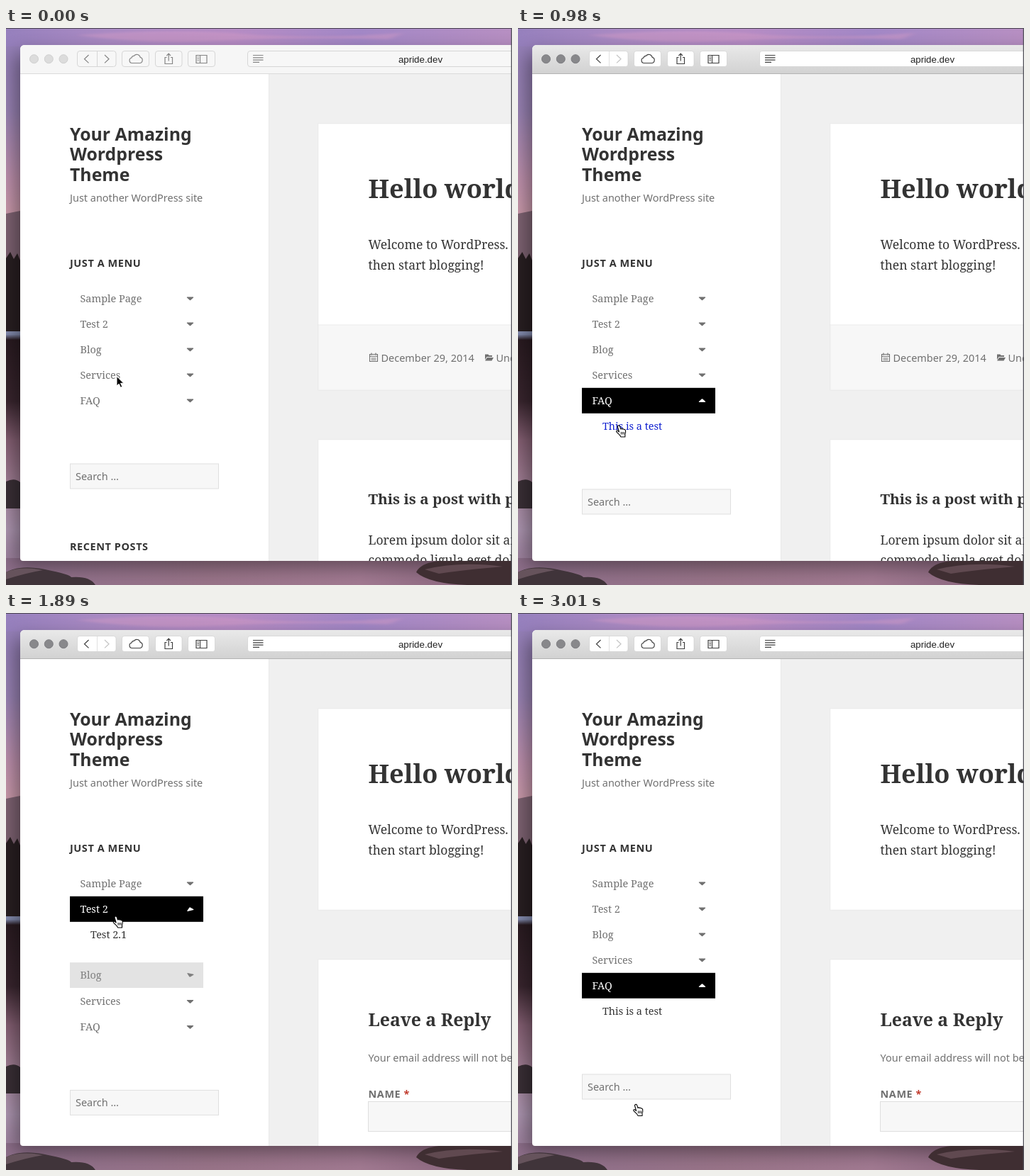
Write an HTML page that moves like this. It is 713 by 786 pixels and loops after 3.08 s.

```html
<!DOCTYPE html>
<html lang="en">
<head>
<meta charset="utf-8">
<title>Accordion menu</title>
<style>
html, body { margin: 0; width: 100%; height: 100%; overflow: hidden; background: #7d6480; }
#stage { display: block; width: 713px; height: 786px; }
text { white-space: pre; }
.sans { font-family: "Noto Sans", "Open Sans", sans-serif; font-size: 14.46px; }
.serif { font-family: "Noto Serif", serif; font-size: 14.46px; }
.ui { font-family: "Liberation Sans", Arial, sans-serif; font-size: 13.3px; }
.body { font-size: 17.56px; }
.big { font-size: 36.16px; }
.b { font-weight: 700; }
.caps { letter-spacing: .04em; }
.dark { fill: #333; }
.grey { fill: #707070; }
.box { fill: #f7f7f7; stroke: #dfdfdf; }
.card { fill: #fff; stroke: #000; stroke-opacity: .045; }

.bar { fill: url(#barOn); }
.rule { fill: #b3b3b3; }
.light { fill: #88888b; stroke: #7c7c80; }
.btn { fill: #fff; stroke: #c6c6c6; stroke-opacity: .55; }
.icon { fill: none; stroke: #404040; stroke-width: 1.2; }
.weak { stroke: #c4c4c4; }
.off .bar { fill: #f6f6f6; }
.off .rule { fill: #dadada; }
.off .light { fill: #dcdcdc; stroke: #cfcfcf; }
.off .btn { fill: #f7f7f7; stroke: #d6d6d6; stroke-opacity: 1; }
.off .icon { stroke: #858585; }
</style>
</head>
<body>
<svg id="stage" viewBox="0 0 713 786">
  <defs>
    <linearGradient id="barOn" x2="0" y2="1">
      <stop stop-color="#e9e9e9"/><stop offset="1" stop-color="#d2d2d2"/>
    </linearGradient>
    <linearGradient id="top">
      <stop stop-color="#9680bd"/><stop offset=".2" stop-color="#aa8ac3"/><stop offset=".45" stop-color="#b68cc4"/>
      <stop offset=".7" stop-color="#a287c6"/><stop offset="1" stop-color="#b78fc2"/>
    </linearGradient>
    <linearGradient id="left" x2="0" y2="1">
      <stop stop-color="#937eb8"/><stop offset=".15" stop-color="#9d86b8"/><stop offset=".27" stop-color="#c495b2"/>
      <stop offset=".34" stop-color="#d2a0b0"/><stop offset=".55" stop-color="#8790b4"/><stop offset=".56" stop-color="#2b1c22"/>
      <stop offset=".67" stop-color="#3b2730"/><stop offset=".74" stop-color="#886276"/><stop offset=".82" stop-color="#a7849b"/>
      <stop offset=".9" stop-color="#b29ab6"/><stop offset="1" stop-color="#937391"/>
    </linearGradient>
    <linearGradient id="water">
      <stop stop-color="#8f708c"/><stop offset=".4" stop-color="#997489"/><stop offset=".7" stop-color="#a27a92"/><stop offset="1" stop-color="#84627a"/>
    </linearGradient>
    <linearGradient id="sky" x2="0" y2="1">
      <stop stop-color="#c4431d"/><stop offset=".2" stop-color="#cb461a"/><stop offset=".34" stop-color="#d5481a"/>
      <stop offset=".45" stop-color="#d83b17"/><stop offset=".56" stop-color="#b92c18"/><stop offset=".68" stop-color="#872118"/><stop offset="1" stop-color="#571610"/>
    </linearGradient>
    <linearGradient id="hill" x2="0" y2="1">
      <stop stop-color="#250c08"/><stop offset="1" stop-color="#0b0303"/>
    </linearGradient>
    <filter id="soft" x="-20%" y="-100%" width="140%" height="300%"><feGaussianBlur stdDeviation="5 1.6"/></filter>
    <filter id="shade" x="-20%" y="-20%" width="140%" height="140%"><feGaussianBlur stdDeviation="14"/></filter>
    <clipPath id="win"><path d="M713 24H26a6 6 0 0 0-6 6V748a4 4 0 0 0 4 4H713z"/></clipPath>
    <clipPath id="photo"><rect x="449" y="135" width="264" height="443"/></clipPath>
  </defs>

  <!-- desktop -->
  <rect width="713" height="786" fill="url(#left)"/>
  <path d="M0 262L20 258V330H0z" fill="#826676"/>
  <path d="M0 325L6 316 11 326 16 318 20 328V428H0z" fill="#2a2023"/>
  <path d="M0 640Q12 634 20 641V678H0z" fill="#3c3138"/>
  <rect width="713" height="26" fill="url(#top)"/>
  <path d="M100 10Q230 0 330 8T560 7L540 16Q400 12 300 18T100 10z" fill="#d49cc7" opacity=".45" filter="url(#soft)"/>
  <rect y="748" width="713" height="38" fill="url(#water)"/>
  <rect x="12" y="36" width="730" height="724" fill="#000" opacity=".42" filter="url(#shade)"/>
  <path d="M0 768Q20 757 55 764T92 775Q118 773 126 786H0z" fill="#40343a"/>
  <path d="M0 768Q20 759 52 765Q28 769 0 778z" fill="#66535c"/>
  <path d="M578 768Q584 755 610 752H713V786H650Q596 784 578 768z" fill="#3f2e32"/>
  <path d="M590 764Q640 752 700 760Q650 764 610 770z" fill="#604950"/>

  <g clip-path="url(#win)">
    <rect x="20" y="24" width="693" height="728" fill="#fff"/>
    <rect x="370" y="64" width="343" height="688" fill="#f0f0f0"/>
    <rect x="370" y="64" width="1" height="688" fill="#e8e8e8"/>

    <g id="chrome">
      <rect class="bar" x="20" y="24" width="693" height="40"/>
      <rect class="rule" x="20" y="64" width="693" height="1"/>
      <circle class="light" cx="39.5" cy="43.7" r="6"/>
      <circle class="light" cx="60.3" cy="43.7" r="6"/>
      <circle class="light" cx="81" cy="43.7" r="6"/>
      <g class="btn">
        <rect x="100.5" y="32.5" width="54.5" height="22" rx="3.5"/>
        <path d="M128.5 33V54"/>
        <rect x="163.5" y="32.5" width="38" height="22" rx="3.5"/>
        <rect x="210.5" y="32.5" width="37.5" height="22" rx="3.5"/>
        <rect x="256.5" y="32.5" width="38" height="22" rx="3.5"/>
        <rect x="340.5" y="32.5" width="400" height="22" rx="3.5"/>
      </g>
      <path class="icon" stroke-width="1.6" d="M116.5 38L110.500 43.700 116.500 49.400"/>
      <path class="icon weak" d="M139 38L145 43.700 139 49.400"/>
      <path class="icon" d="M177.500 49.500a3.800 3.800 0 0 1-.4-7.500 3 3 0 0 1 3.300-2.700 5 5 0 0 1 8.800 2 4.200 4.200 0 0 1-.7 8.200z"/>
      <path class="icon" d="M226.500 41.500H224V50.500H234.500V41.500H232M229.200 46.500V36.500M226.300 39.200L229.200 36.200 232.100 39.200"/>
      <path class="icon" d="M268 38.500H283V49.500H268zM273.500 38.500V49.500M269.500 41H272M269.500 43.500H272M269.500 46H272"/>
      <path class="icon" stroke="#666" d="M348 38.500H362.500M348 41.800H362.500M348 45.100H362.500M348 48.400H357"/>
      <text class="ui" x="584" y="48.500" text-anchor="middle" fill="#222">apride.dev</text>
    </g>

    <g class="sans b dark" style="font-size:24.8px">
      <text x="90" y="158.500">Your Amazing</text>
      <text x="90" y="187.400">Wordpress</text>
      <text x="90" y="216.300">Theme</text>
    </g>
    <text class="sans grey" x="90" y="245">Just another WordPress site</text>
    <text class="sans b caps dark" x="90" y="336.500">JUST A MENU</text>
    <g id="menu"></g>
    <g id="below">
      <rect class="box" x="90.500" y="615" width="209" height="35"/>
      <text class="sans grey" x="98" y="638">Search …</text>
      <text class="sans b caps dark" x="90" y="736.800">RECENT POSTS</text>
    </g>

    <g id="hello">
      <rect class="card" x="440" y="135" width="300" height="284"/>
      <text class="serif b dark big" x="510.500" y="239.500">Hello world!</text>
      <text class="serif body dark" x="510.500" y="311.500">Welcome to WordPress. This is your first post.</text>
      <text class="serif body dark" x="510.500" y="340.500">then start blogging!</text>
    </g>

    <g id="list">
      <rect x="440" y="419" width="300" height="92" fill="#f7f7f7" stroke="#000" stroke-opacity=".045"/>
      <path d="M512.500 460.500H523.500V470.500H512.500zM512.500 463.200H523.500M515 458.500V461.500M521 458.500V461.500M514.500 466H521.500M514.500 468.300H521.500" fill="none" stroke="#707070" stroke-width="1.100"/>
      <text class="sans grey" x="528.500" y="470.800">December 29, 2014</text>
      <path d="M675 460.500H679.500L680.500 462H685V464H677.500L675 468zM678 465H687L684.500 469.500H675z" fill="#707070"/>
      <text class="sans grey" x="690.500" y="470.800">Uncategorized</text>
      <rect class="card" x="440" y="581" width="300" height="220"/>
      <text class="serif b dark" style="font-size:20.66px" x="510.500" y="672">This is a post with pictures</text>
    </g>

    <g id="post">
      <rect class="card" x="440" y="135" width="300" height="660"/>
      <g clip-path="url(#photo)">
        <rect x="449" y="135" width="264" height="443" fill="url(#sky)"/>
        <g filter="url(#soft)">
          <path d="M500 150Q560 145 600 152Q550 156 500 150zM600 188Q660 180 713 186V192Q650 193 600 188z" fill="#ee7a35"/>
          <path d="M449 222Q540 214 640 226Q540 234 449 230z" fill="#b23817"/>
          <path d="M449 294Q560 284 713 287V292Q560 289 449 298z" fill="#ff9a30"/>
          <path d="M449 322Q540 304 713 302V322Q580 312 449 332z" fill="#f4641c"/>
          <path d="M560 340Q640 322 713 334V354Q640 350 560 340z" fill="#ff8a22"/>
          <path d="M640 378Q680 366 713 372V386Q680 388 640 378z" fill="#ff7a1c"/>
          <path d="M449 350Q540 342 640 360T713 366V372Q580 372 449 362z" fill="#a72416"/>
          <path d="M449 436Q490 408 530 430T640 432L713 428V480H449z" fill="#6d1b14"/>
        </g>
        <path d="M449 452Q520 458 580 463T713 473V578H449z" fill="url(#hill)"/>
        <circle cx="713" cy="488" r="16" fill="#9c1a0c" opacity=".22"/>
      </g>
      <text class="serif b dark big" x="510.500" y="656">This is a test</text>
    </g>

    <g id="lorem" class="serif dark">
      <text class="body" x="510.500" y="728.500">Lorem ipsum dolor sit amet,</text>
      <text class="body" x="510.500" y="757.400">commodo ligula eget dolor.</text>
    </g>

    <g id="reply">
      <rect class="card" x="440" y="489" width="300" height="300"/>
      <text class="serif b dark" style="font-size:24.8px" x="510.500" y="582.800">Leave a Reply</text>
      <text class="sans grey" x="510.500" y="633">Your email address will not be published.</text>
      <text class="sans b caps grey" x="510.500" y="684">NAME <tspan fill="#c0392b">*</tspan></text>
      <rect class="box" x="510.500" y="689.500" width="250" height="42"/>
    </g>
  </g>

  <rect width="713" height="1" fill="#4a4550"/>
  <rect x="711.700" width="1.300" height="786" fill="#55555c"/>

  <path id="arrow" d="M.5 .5V14L3.700 11.200 6 16.300 8.300 15.200 6 10.300H10.300z" fill="#000" stroke="#fff" stroke-width="1"/>
  <g id="hand" stroke="#000" stroke-width="1.100" stroke-linejoin="round">
    <path fill="#fff" d="M3.200 1.200C4.400.4 5.400 1.200 5.800 2.400L7 6C7.600 5 9 5.200 9.300 6.200 10 5.400 11.300 5.700 11.600 6.700 12.600 6.200 13.600 7 13.700 8.400 13.900 10.600 13.900 12 13 13.600V17H7C6.500 14.500 3 12.500 1 9.800 .2 8.600 1.500 7.600 3 8.600L4.600 10 2.600 3C2.300 2.200 2.600 1.600 3.200 1.200z"/>
    <path fill="none" stroke-width=".9" d="M7.500 10V13.500M9.500 10V13.500M11.500 10V13.500"/>
  </g>
</svg>

<script>
const LOOP = 3080, STEP = 70, FADE = 200, ROW = 36, GAP = 22, END = 1e6;
const FOCUS = 140, LINK_CLICK = 980, POST_AT = 1090, REPLY_AT = 1610;

// open and dark hold [from, to] times in ms
const items = [
  { name: "Sample Page", sub: ["Test 1", "Test 1.2"], open: [[1985, 2268]], dark: [[1940, 2268]] },
  { name: "Test 2", sub: ["Test 2.1"], open: [[1704, 1985]], dark: [[1660, 1985]] },
  { name: "Blog", sub: ["Hello world!", "News"], open: [[1255, 1704]], dark: [[1230, 1704]] },
  { name: "Services", sub: ["Landing Page", "Web Design", "Hosting", "Support"],
    open: [[2268, 2710]], dark: [[150, 516], [2230, 2710]] },
  { name: "FAQ", sub: ["This is a test"], open: [[730, 1255], [2710, END]], dark: [[516, 1255], [2650, END]] }
];

// time, x, y
const path = [
  [0, 155.5, 491], [210, 155, 491], [420, 150, 494], [560, 140, 520], [700, 134, 532], [770, 134, 531],
  [890, 137, 560], [1010, 138, 560], [1190, 145, 525.5], [1260, 150, 460], [1470, 151.5, 448.5],
  [1540, 151.5, 488], [1600, 151.5, 488], [1700, 150.5, 424], [1890, 150.5, 427], [1970, 151, 380],
  [2090, 152, 382], [2268, 160, 590], [2310, 160, 592], [2440, 160, 598], [2660, 162, 692.5], [LOOP, 162, 692.5]
];

const $ = id => document.getElementById(id);
const clamp = v => Math.min(1, Math.max(0, v));
const swing = x => .5 - Math.cos(Math.PI * x) / 2;
const mix = (a, b, k) => a + (b - a) * k;

function add(parent, tag, attrs, text) {
  const el = document.createElementNS("http://www.w3.org/2000/svg", tag);
  for (const key in attrs) el.setAttribute(key, attrs[key]);
  if (text) el.textContent = text;
  return parent.appendChild(el);
}

// Sum of ramps: each span eases in at its start and out at its end
const level = (spans, t, ease) => spans.reduce((sum, [from, to]) =>
  sum + ease(clamp((t - from) / FADE)) - ease(clamp((t - to) / FADE)), 0);

items.forEach((it, i) => {
  const last = i === items.length - 1;
  it.full = it.sub.length * ROW + (last ? 0 : GAP);
  it.g = add($("menu"), "g", {});
  it.bg = add(it.g, "rect", { x: 90, width: 188, height: ROW });
  it.label = add(it.g, "text", { class: "serif", x: 104.5, y: 23.2 }, it.name);
  it.tri = add(it.g, "path", { d: "M-4.3 -2.3H4.3Q5 -2 4.500 -1.300L.7 2.300Q0 2.800 -.7 2.300L-4.500 -1.300Q-5 -2 -4.300 -2.300z" });
  it.pane = add(it.g, "svg", { x: 90, y: ROW, width: 230, height: 0, overflow: "hidden" });
  it.links = it.sub.map((s, n) =>
    add(it.pane, "text", { class: "serif dark", x: 29, y: n * ROW + 23.2 }, s));
});

function cursorAt(t) {
  const i = Math.max(1, path.findIndex(p => p[0] >= t));
  const [a, b] = [path[i - 1], path[i]];
  const k = swing(clamp((t - a[0]) / (b[0] - a[0])));
  return [mix(a[1], b[1], k), mix(a[2], b[2], k)];
}

const show = (id, on) => $(id).setAttribute("display", on ? "inline" : "none");

function draw(t) {
  let y = 363.8;
  for (const it of items) {
    const dark = level(it.dark, t, x => x ** 1.6);
    const turn = level(it.open, t, x => x);
    const height = it.full * level(it.open, t, swing);
    const tone = Math.round(mix(112, 255, dark));
    const color = `rgb(${tone},${tone},${tone})`;
    it.g.setAttribute("transform", `translate(0 ${y})`);
    it.bg.setAttribute("fill-opacity", dark);
    it.label.setAttribute("fill", color);
    it.tri.setAttribute("fill", color);
    it.tri.setAttribute("transform", `translate(259.5 18) rotate(${180 * turn})`);
    it.pane.setAttribute("height", height);
    it.pane.setAttribute("display", height > 0 ? "inline" : "none");
    y += ROW + height;
  }
  $("below").setAttribute("transform", `translate(0 ${y - 543.8})`);
  items[4].links[0].style.fill = t >= LINK_CLICK && t < 1500 ? "#1020d0" : "";

  const onPost = t >= POST_AT && t < REPLY_AT, onReply = t >= REPLY_AT;
  show("hello", !onPost);
  show("list", !onPost && !onReply);
  show("post", onPost);
  show("lorem", !onReply);
  show("reply", onReply);

  const active = t >= FOCUS;
  $("chrome").setAttribute("class", active ? "" : "off");
  show("arrow", !active);
  show("hand", active);
  const [cx, cy] = cursorAt(t);
  $(active ? "hand" : "arrow").setAttribute("transform", `translate(${cx} ${cy})`);
}

const start = performance.now();
function tick() {
  const t = Math.max(0, performance.now() - start) % LOOP;
  draw(Math.floor(t / STEP) * STEP);
  requestAnimationFrame(tick);
}
tick();
</script>
</body>
</html>
```
